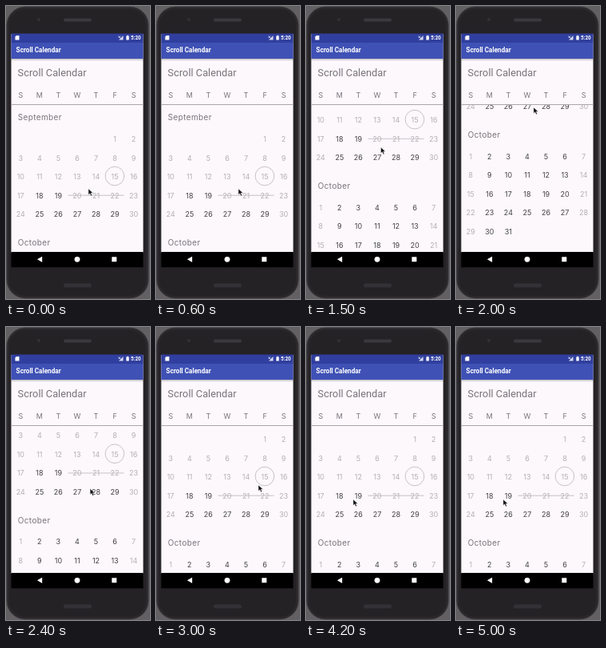
Write an HTML page that moves like this. It is 180 px wide and 367 px high and loops after 5100 ms.

```html
<!DOCTYPE html>
<html lang="en">
<head>
<meta charset="utf-8">
<title>Scroll Calendar</title>
<style>
html, body { margin: 0; width: 100%; height: 100%; overflow: hidden; background: #626062; }
svg { display: block; width: 180px; height: 367px; font-family: Roboto, sans-serif; }
.cal { font-family: Inter, sans-serif; font-size: 9px; fill: #b3b0b4; }
.mid { text-anchor: middle; }
.month { font-size: 10px; letter-spacing: .35px; fill: #78757a; }
.open { fill: #444246; }
.line { fill: none; stroke: #b8b5b9; stroke-width: .8; }
</style>
</head>
<body>
<svg viewBox="0 0 180 367">
  <defs>
    <clipPath id="list"><rect x="7" y="124" width="164" height="184"/></clipPath>
    <linearGradient id="shade" x2="0" y2="1">
      <stop stop-color="#000" stop-opacity=".25"/>
      <stop offset="1" stop-color="#000" stop-opacity="0"/>
    </linearGradient>
  </defs>

  <!-- phone -->
  <rect x="1" y="1" width="177" height="365" rx="23" fill="#2b282c" stroke="#3d3a3e"/>
  <rect x="4" y="4" width="171" height="359" rx="20" fill="#252226"/>
  <circle cx="41" cy="17" r="2" fill="#343136"/>
  <rect x="72" y="15.5" width="35" height="4" rx="2" fill="#3b383d"/>
  <rect x="72" y="347.5" width="35" height="5" rx="2.5" fill="#343136"/>

  <!-- screen -->
  <rect x="6.5" y="35" width="165" height="274" fill="#fcf8fc"/>
  <rect x="6.5" y="66" width="165" height="3" fill="url(#shade)"/>
  <rect x="6.5" y="34.5" width="165" height="12" fill="#303f9f"/>
  <rect x="6.5" y="46" width="165" height="20" fill="#3f51b5"/>
  <g fill="#fff">
    <path d="M11.5 38.5l1.5-1.5h3.5v5.5h-5z"/>
    <path d="M146.5 37v5.5h-5.5z" opacity=".8"/>
    <path d="M140.5 37.5l2.5 2.5m0-2.5l-2.5 2.5" stroke="#fff" stroke-width=".8"/>
    <path d="M150.3 37.5h1v-.7h1.4v.7h1v5h-3.4z"/>
    <text x="156" y="42.2" font-size="6.3" font-weight="700">5:20</text>
    <text x="12.6" y="58.4" font-size="8.2" font-weight="700">Scroll Calendar</text>
  </g>
  <text x="14.6" y="88.3" font-size="12.8" fill="#78757a">Scroll Calendar</text>
  <g id="days" class="cal mid" style="fill:#78757a"></g>
  <path d="M6.5 123.5h165" stroke="#aaa7ab"/>
  <g clip-path="url(#list)"><g id="months" class="cal"></g></g>

  <!-- navigation -->
  <rect x="6.5" y="308" width="165" height="19.3"/>
  <g fill="#fff">
    <path d="M39 317.3l6.2-3.6v7.2z"/>
    <circle cx="89" cy="317.3" r="3.4"/>
    <rect x="132.3" y="314.3" width="6" height="6"/>
  </g>

  <path id="cursor" d="M0 0v7.4l1.8-1.6 1.3 3 1.4-.6-1.3-2.9h2.5z" fill="#111" stroke="#fff" stroke-width=".4"/>
</svg>
<script>
const LOOP = 5100, STEP = 100, PITCH = 23.55;
const $ = id => document.getElementById(id);
const colX = col => 18.3 + PITCH * col;
const label = (x, y, s, cls = "") => `<text x="${x}" y="${y}" class="${cls}">${s}</text>`;

function month(name, titleY, firstCol, count, isOpen) {
  let out = label(14.8, titleY + 3.7, name, "month");
  for (let day = 1; day <= count; day++) {
    const cell = firstCol + day - 1, col = cell % 7;
    const y = titleY + 27 + PITCH * Math.floor(cell / 7);
    const open = col > 0 && col < 6 && isOpen(day);
    out += label(colX(col), y + 3.4, day, open ? "mid open" : "mid");
  }
  return out;
}

$("days").innerHTML = [..."SMTWTFS"].map((d, i) => label(colX(i), 115.3, d)).join("");
$("months").innerHTML =
  month("September", 139.7, 5, 30, d => d > 17 && (d < 20 || d > 22)) +
  month("October", 296.2, 0, 31, () => true) +
  '<circle class="line" cx="135.9" cy="213" r="11.8"/><path class="line" d="M77.5 237.2H147.5"/>';

// smooth progress from 0 to 1 between two times
function ease(t, from, to) {
  const u = Math.min(1, Math.max(0, (t - from) / (to - from)));
  return u * u * (3 - 2 * u);
}

// drag up to the end of October, then back down to the top of September
const scrollAt = t => 135 * ease(t, 1190, 1790) - 109 * ease(t, 2000, 2600);

// pointer stops: time, x, y
const stops = [[600, 103, 229], [1000, 101, 258], [1200, 100, 245], [1500, 93.5, 177],
  [2000, 97, 127], [2600, 108, 229], [3000, 128, 198], [3900, 108, 203], [4200, 59, 216]];

function pointerAt(t) {
  let [, x, y] = stops[0];
  for (let i = 1; i < stops.length; i++) {
    const [from, x0, y0] = stops[i - 1], [to, x1, y1] = stops[i], u = ease(t, from, to);
    x += (x1 - x0) * u;
    y += (y1 - y0) * u;
  }
  return [x, y];
}

const start = performance.now();
function tick() {
  const t = Math.floor((performance.now() - start) % LOOP / STEP) * STEP;
  $("months").setAttribute("transform", `translate(0 ${-scrollAt(t)})`);
  $("cursor").setAttribute("transform", `translate(${pointerAt(t)})`);
  requestAnimationFrame(tick);
}
tick();
</script>
</body>
</html>
```
